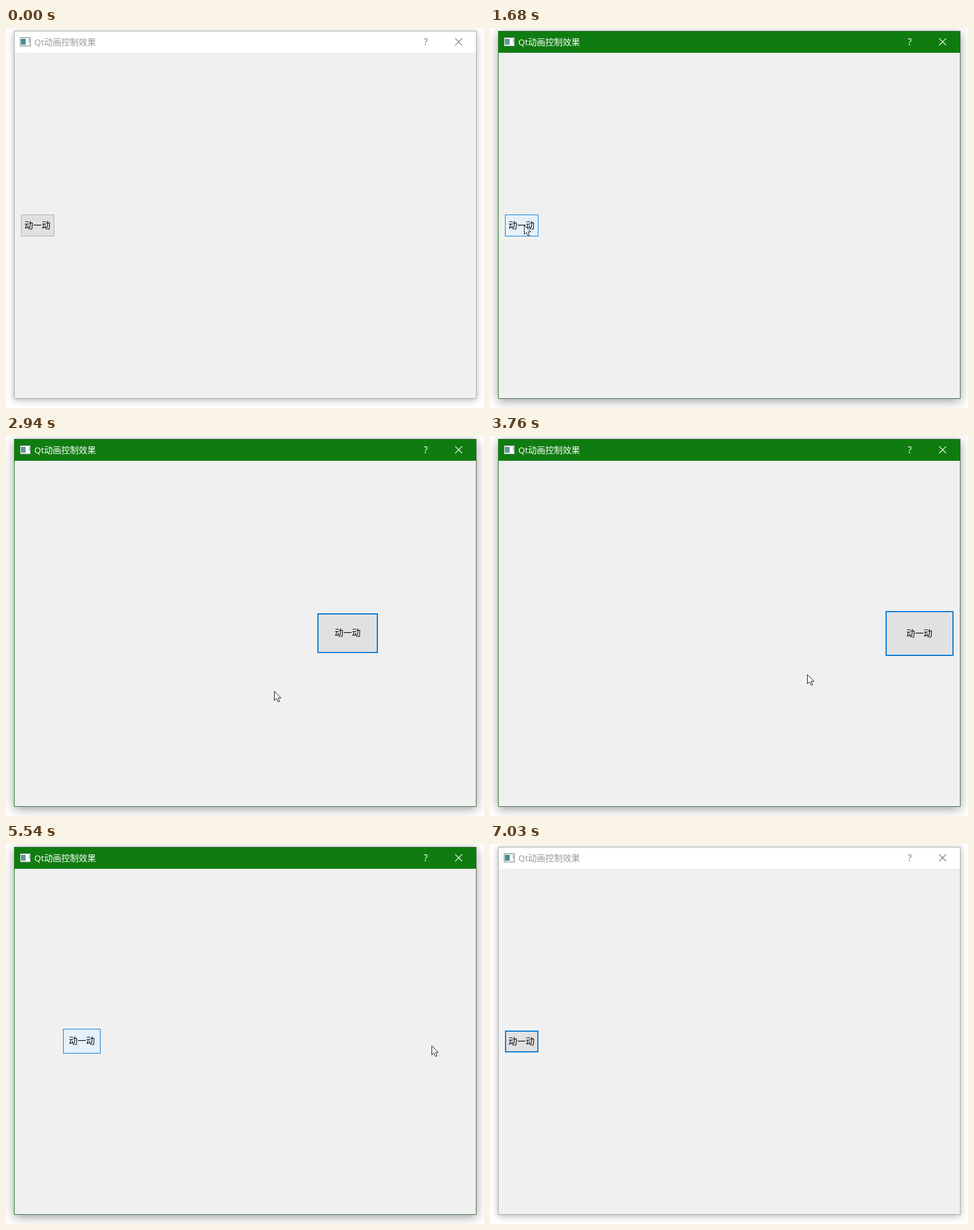
Recreate the animation shown at these times as an HTML page with a canvas. Size 829 by 660 pixels, loop 7.17 s.

```html
<!DOCTYPE html>
<html lang="zh">
<head>
<meta charset="utf-8">
<style>
  html, body { margin: 0; width: 829px; height: 660px; overflow: hidden; background: #fff; }
  canvas { display: block; }
</style>
</head>
<body>
<canvas id="stage" width="829" height="660"></canvas>
<script>
const ctx = document.getElementById('stage').getContext('2d');
const LOOP = 7170, STEP = 74;
const FONT = '"Open Sans", "Noto Sans CJK SC", "Noto Sans CJK", sans-serif';
const BLUE = '#0078d7', GREEN = '#107c10';

const mix = (a, b, k) => a + (b - a) * k;
const progress = (t, from, to) => Math.min(1, Math.max(0, (t - from) / (to - from)));
const smooth = k => k * k * (3 - 2 * k);
const within = (t, from, to) => t >= from && t < to;

function outBounce(s) {
  const arc = (mid, floor) => 7.5625 * (s - mid) ** 2 + floor;
  if (s < 4 / 11) return arc(0, 0);
  if (s < 8 / 11) return arc(6 / 11, 0.75);
  if (s < 10 / 11) return arc(9 / 11, 0.9375);
  return arc(10.5 / 11, 0.984375);
}

// 0 = small button on the left, 1 = large button on the right
const travel = t =>
  outBounce(progress(t, 1819, 3669)) - outBounce(progress(t, 4256, 6134));

// Each pointer move eases from the previous resting place
function pointerAt(t) {
  let x = 555, y = 512;
  const move = (from, to, nextX, nextY) => {
    const k = smooth(progress(t, from, to));
    x = mix(x, nextX, k);
    y = mix(y, nextY, k);
  };
  move(120, 820, 204, 30);
  move(1000, 1680, 59, 342);
  move(1900, 2700, 465, 443);
  move(3540, 4128, 738, 350);
  move(6150, 6780, 795, 636);
  return [Math.round(x), Math.round(y)];
}

function rect(color, x, y, w, h) {
  ctx.fillStyle = color;
  ctx.fillRect(x, y, w, h);
}

function text(str, x, y, color, size = 15, align = 'left') {
  ctx.font = size + 'px ' + FONT;
  ctx.textAlign = align;
  ctx.fillStyle = color;
  ctx.fillText(str, x, y);
}

function path(points) {
  ctx.beginPath();
  points.forEach(([x, y]) => ctx.lineTo(x, y));
}

function drawIcon(active) {
  rect(active ? '#4b8a50' : '#8b8f93', 24, 16, 19, 16);
  rect(active ? '#f0f0f5' : '#e4e8ea', 25, 17, 17, 14);
  const glow = ctx.createLinearGradient(26, 18, 34, 29);
  glow.addColorStop(0, active ? '#5c86a8' : '#3b7fa0');
  glow.addColorStop(1, active ? '#6fa08c' : '#4d9c80');
  rect(glow, 26, 19, 8, 10);
  rect('#ffffff', 35, 19, 4, 10);
  rect('#6f9a8c', 40, 19, 1, 6);
}

function drawWindow(active) {
  const ink = active ? '#ffffff' : '#777777';
  rect('#fff', 0, 0, 829, 660);
  ctx.save();
  ctx.shadowColor = active ? 'rgba(0,0,0,.38)' : 'rgba(0,0,0,.3)';
  ctx.shadowBlur = active ? 17 : 11;
  ctx.shadowOffsetY = active ? 4 : 2;
  rect(active ? '#3f6a42' : '#aaaaaa', 14, 5, 802, 639);
  ctx.restore();
  if (active) rect(GREEN, 14, 5, 1, 639);
  rect('#f0f0f0', 15, 43, 800, 600);
  rect(active ? GREEN : '#ffffff', 15, 6, 800, 37);
  drawIcon(active);
  text('Qt动画控制效果', 49, 30, active ? '#ffffff' : '#999999');
  text('?', 728, 30, ink, 16, 'center');
  ctx.strokeStyle = ink;
  ctx.lineWidth = 1.1;
  path([[779, 18], [791, 30]]);
  ctx.stroke();
  path([[791, 18], [779, 30]]);
  ctx.stroke();
}

function buttonStyle(t) {
  const pressed = within(t, 1750, 1830);
  const hovered = within(t, 1450, 2050) || within(t, 3970, 6150);
  if (pressed) return ['#cce4f7', '#005499', 1];
  if (hovered) return ['#e5f1fb', BLUE, 1];
  return t > 1750 ? ['#e1e1e1', BLUE, 2] : ['#e1e1e1', '#adadad', 1];
}

function drawButton(t) {
  const at = (a, b) => Math.floor(mix(a, b, travel(t)));
  const [fill, edge, line] = buttonStyle(t);
  const x = at(26, 686), y = at(324, 304);
  const w = at(83, 803) + 1 - x, h = at(361, 381) + 1 - y;
  rect(edge, x, y, w, h);
  rect(fill, x + line, y + line, w - 2 * line, h - 2 * line);
  text('动一动', x + Math.floor((w - 45) / 2), Math.floor(y + h / 2) + 5, '#000');
}

function drawPointer(x, y) {
  ctx.save();
  ctx.translate(x + 0.5, y + 0.5);
  path([[0, 0], [0, 16], [3.6, 12.6], [6.5, 18.5], [9, 17.5], [6.4, 11.5], [11.4, 11.5]]);
  ctx.closePath();
  ctx.fillStyle = '#fff';
  ctx.fill();
  ctx.strokeStyle = '#111';
  ctx.lineWidth = 1;
  ctx.stroke();
  ctx.restore();
}

function draw(time) {
  // The screen advances in even steps
  const t = 1020 + STEP * Math.floor((time - 1020 + 12) / STEP);
  drawWindow(within(time, 860, 7030));
  drawButton(t);
  if (within(time, 120, 6800)) drawPointer(...pointerAt(t));
}

const start = performance.now();
function tick() {
  draw((performance.now() - start) % LOOP);
  requestAnimationFrame(tick);
}
tick();
</script>
</body>
</html>
```
